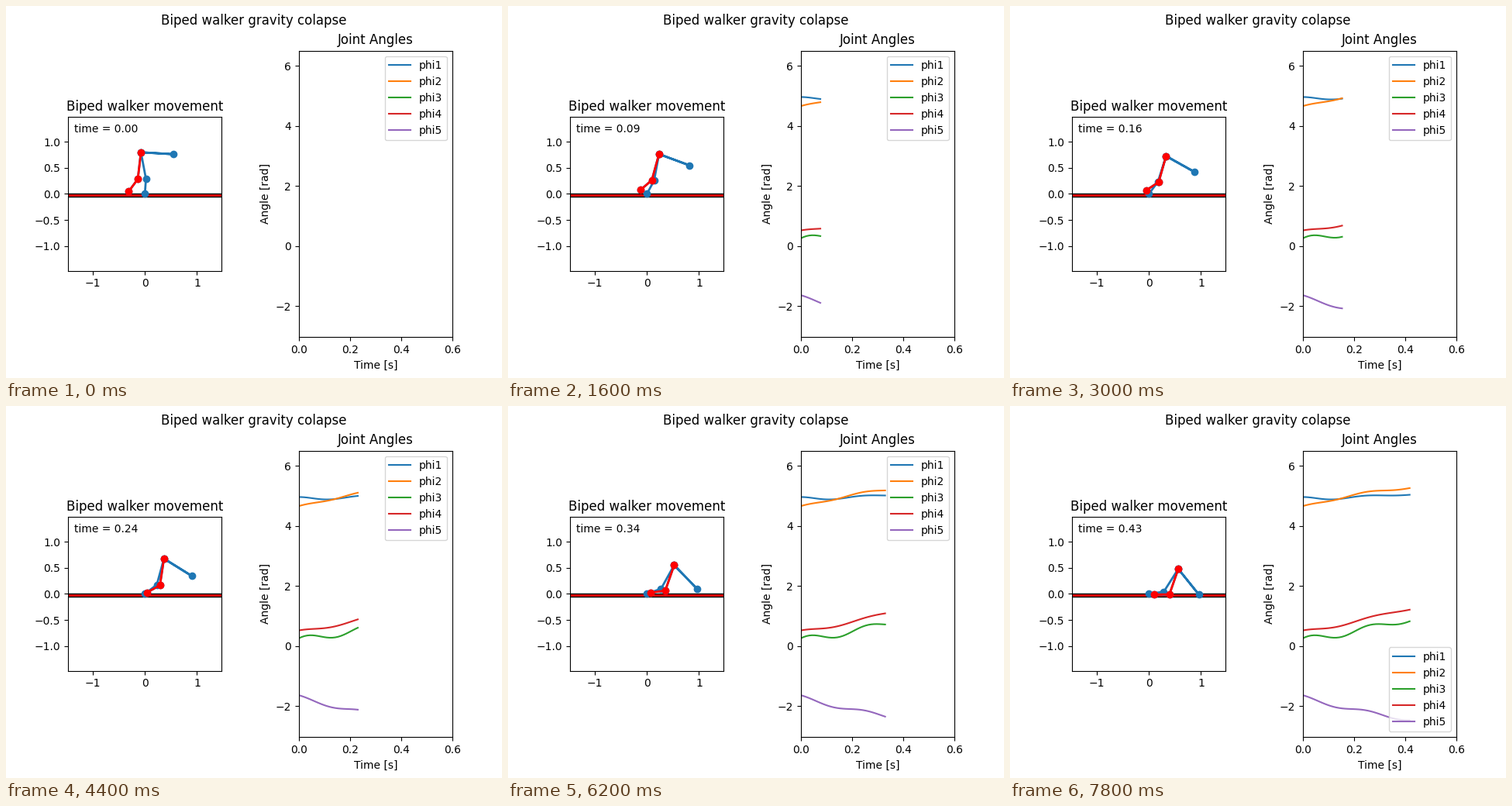
A matplotlib script for the animation above (8 s loop, 640x480 px).

```python
import numpy as np
import matplotlib.pyplot as plt
from matplotlib.animation import FuncAnimation
from matplotlib.patches import Rectangle

FRAMES, INTERVAL = 40, 200
DT = 0.01099
SHIN, THIGH, TORSO = 0.289, 0.518, 0.626
LIM = 1.475

t = np.arange(FRAMES) * DT


def swing(amp, freq, phase=0, decay=0):
    return amp * np.exp(-decay * t) * np.cos(freq * t + phase)


# Each joint drifts steadily and swings around its drift.
phi = np.array([
    4.878 + 0.4 * t + swing(0.08, 24, decay=4),
    4.62 + 2.43 * t - 2.1 * t**2 + swing(0.035, 25.6, phase=-0.1),
    0.158 + 1.72 * t + swing(0.145, 26.5, phase=-0.82, decay=1.6),
    0.44 + 1.9 * t + swing(0.08, 21.5, decay=2.8),
    -1.69 - 2.41 * t + 1.5 * t**2 + swing(0.06, 25),
])


def polar(length, angle):
    return length * np.array([np.cos(angle), np.sin(angle)])


def pose(k):
    """Body and swing leg points, with the stance foot at the origin."""
    p1, p2, p3, p4, p5 = phi[:, k]
    lean = p5 + np.pi / 2
    foot = np.zeros(2)
    knee = foot - polar(SHIN, lean + p1 - p3)
    hip = knee - polar(THIGH, lean + p1)
    head = hip + polar(TORSO, lean)
    knee2 = hip + polar(THIGH, lean + p2)
    foot2 = knee2 + polar(SHIN, lean + p2 - p4)
    body = np.array([foot, knee, hip, head, hip, knee2, foot2])
    return body, body[4:]


fig, (ax, ax2) = plt.subplots(1, 2, figsize=(6.4, 4.8), dpi=100)
fig.subplots_adjust(wspace=0.5)
fig.suptitle("Biped walker gravity colapse")

ax.set_title("Biped walker movement")
ax.set(xlim=(-LIM, LIM), ylim=(-LIM, LIM), xticks=range(-1, 2),
       yticks=np.arange(-1, 1.5, 0.5))
ax.set_aspect("equal")
ax.add_patch(Rectangle((-5, -0.05), 10, 0.05, facecolor="red", edgecolor="black"))
body_line, = ax.plot([], [], "o-", lw=2)
leg_line, = ax.plot([], [], "o-", lw=2, color="red")
clock = ax.text(0.04, 0.9, "", transform=ax.transAxes)

ax2.set_title("Joint Angles")
ax2.set(xlim=(0, 0.6), ylim=(-3.025, 6.5), xlabel="Time [s]", ylabel="Angle [rad]",
        xticks=np.linspace(0, 0.6, 4), yticks=range(-2, 7, 2))
curves = [ax2.plot([], [], label=f"phi{n}")[0] for n in range(1, 6)]
ax2.legend(loc="best")


def update(k):
    body, leg = pose(k)
    body_line.set_data(*body.T)
    leg_line.set_data(*leg.T)
    clock.set_text(f"time = {t[k]:.2f}")
    for curve, angle in zip(curves, phi):
        curve.set_data(t[:k], angle[:k])
    return [body_line, leg_line, clock, *curves]


anim = FuncAnimation(fig, update, frames=FRAMES, interval=INTERVAL, repeat=True,
                     repeat_delay=0)
plt.show()
```
